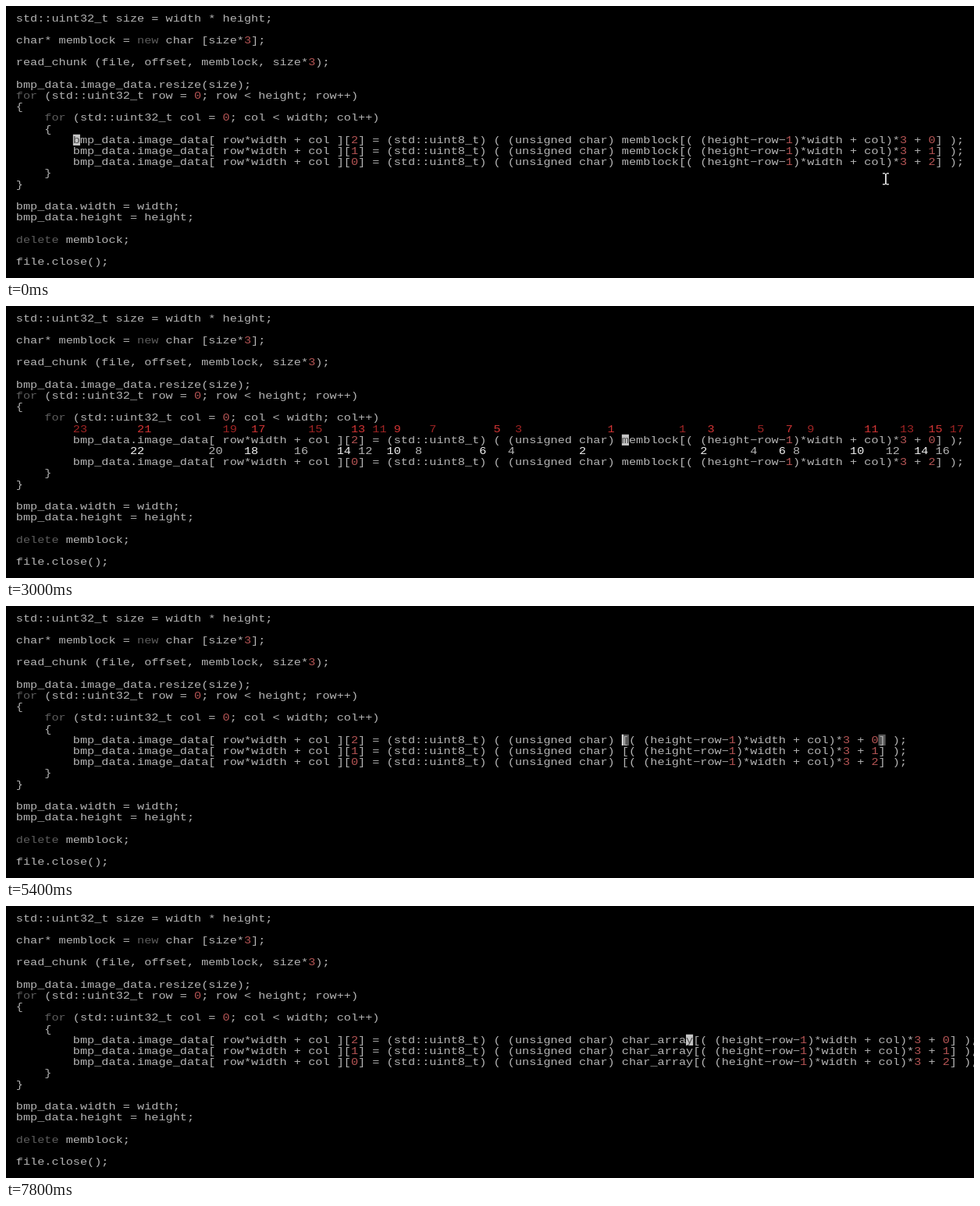
An HTML page with a canvas for the animation above (8000 ms loop, 1240 by 349 pixels).

```html
<!DOCTYPE html>
<html lang="en">
<head>
<meta charset="utf-8">
<style>
html, body { margin: 0; width: 100%; height: 100%; overflow: hidden; background: #000; }
canvas { display: block; }
</style>
</head>
<body>
<canvas width="1240" height="349"></canvas>
<script>
const ctx = document.querySelector('canvas').getContext('2d');

const LOOP = 8000, LEFT = 12.8, TOP = 8.7, CELL = 9.13, ROW = 14.19;
const FONT = 12.5, ASPECT = CELL / (FONT * 0.6); // wide terminal pixels
const FIRST = 11, LAST = 13, WORD = 85;          // edited rows and column
const OLD_NAME = 'memblock', NEW_NAME = 'char_array';
const KEYS = [5800, 5900, 6000, 6500, 6700, 6800, 7100, 7300, 7400, 7500];
const LABELS_ON = 1600, JUMP = 3000, LABELS_OFF = 3700;
const BLOCK = 4500, EXTEND = 4800, CHANGE = 5400, ESCAPE = 7700;

const CODE = `std::uint32_t size = width * height;

char* memblock = new char [size*3];

read_chunk (file, offset, memblock, size*3);

bmp_data.image_data.resize(size);
for (std::uint32_t row = 0; row < height; row++)
{
    for (std::uint32_t col = 0; col < width; col++)
    {



    }
}

bmp_data.width = width;
bmp_data.height = height;

delete memblock;

file.close();`.split('\n');

const assignment = (i, name) => ' '.repeat(8) +
  `bmp_data.image_data[ row*width + col ][${2 - i}] = (std::uint8_t) ` +
  `( (unsigned char) ${name}[( (height−row−1)*width + col)*3 + ${i}] );`;

const x = col => LEFT + col * CELL;
const y = row => TOP + row * ROW;

function box(col, row, color, cells = 1, rows = 1) {
  ctx.fillStyle = color;
  ctx.fillRect(x(col), y(row), cells * CELL, rows * ROW);
}

function text(str, col, row, color) {
  ctx.save();
  ctx.translate(x(col), y(row) + 11);
  ctx.scale(ASPECT, 1);
  ctx.font = `${FONT}px "Liberation Mono", monospace`;
  ctx.fillStyle = color;
  ctx.fillText(str, 0, 0);
  ctx.restore();
}

function codeLine(line, row) {
  for (const { 0: token, index } of line.matchAll(/\w+|[^\w\s]+/g)) {
    const color = /^(for|new|delete)$/.test(token) ? '#5c5c5c'
      : /^\d+$/.test(token) ? '#b45454' : '#b4b4b4';
    text(token, index, row, color);
  }
}

function blockCursor(line, col, row) {
  box(col, row, '#c4c4c4');
  text(line[col], col, row, '#4c4c4c');
}

// Word distances from the cursor: odd above the line, even below it
function labels(line, cursorCol) {
  const words = [...line.matchAll(/\w+|[^\w\s]+/g)];
  const current = words.findIndex(w => w.index === cursorCol);
  words.forEach((word, i) => {
    const n = Math.abs(i - current), odd = n % 2;
    if (!n) return;
    const bright = odd ? n % 4 === (i < current ? 1 : 3) : n % 4 === (current ? 2 : 0);
    const color = odd ? (bright ? '#d23434' : '#a02424') : (bright ? '#f0f0f0' : '#b4b4b4');
    text(String(n), word.index, odd ? FIRST - 1 : FIRST + 1, color);
  });
}

function mousePointer() {
  ctx.fillStyle = '#d0d0d0';
  ctx.fillRect(1126, 215, 2, 14);
  for (const top of [214, 228]) {
    ctx.fillRect(1123, top, 3, 1.5);
    ctx.fillRect(1128, top, 3, 1.5);
  }
}

function draw(t) {
  ctx.fillStyle = '#000';
  ctx.fillRect(0, 0, 1240, 349);

  const typed = KEYS.filter(k => k <= t).length;
  const labelled = t >= LABELS_ON && t < LABELS_OFF;
  const inserting = t >= CHANGE && t < ESCAPE;
  const selecting = t >= BLOCK && t < CHANGE;
  const rows = [0, 1, 2].map(i => assignment(i,
    t < CHANGE ? OLD_NAME
      : t >= ESCAPE ? NEW_NAME
      : i ? '' : NEW_NAME.slice(0, typed)));
  const span = t < EXTEND ? 1 : OLD_NAME.length;
  const caret = WORD + typed;

  if (selecting) box(WORD, FIRST, '#505050', span, 3);
  if (inserting) {
    box(caret, FIRST, '#585858');
    box(rows[0].lastIndexOf(']'), FIRST, '#585858');
  }

  CODE.forEach((line, row) => {
    if (!(labelled && row === FIRST - 1)) codeLine(line, row);
  });
  rows.forEach((line, i) => {
    if (!(labelled && i === 1)) codeLine(line, FIRST + i);
  });

  const cursorCol = t < JUMP ? 8 : WORD;
  if (labelled) labels(rows[0], cursorCol);

  if (inserting) {
    ctx.fillStyle = '#e0e0e0';
    ctx.fillRect(x(caret), y(FIRST), 2, ROW);
  } else if (selecting) {
    blockCursor(rows[2], WORD + span - 1, LAST);
  } else {
    blockCursor(rows[0], t >= ESCAPE ? WORD + NEW_NAME.length - 1 : cursorCol, FIRST);
  }

  if (t < 200) mousePointer();
}

function tick() {
  draw(performance.now() % LOOP);
  requestAnimationFrame(tick);
}
tick();
</script>
</body>
</html>
```
